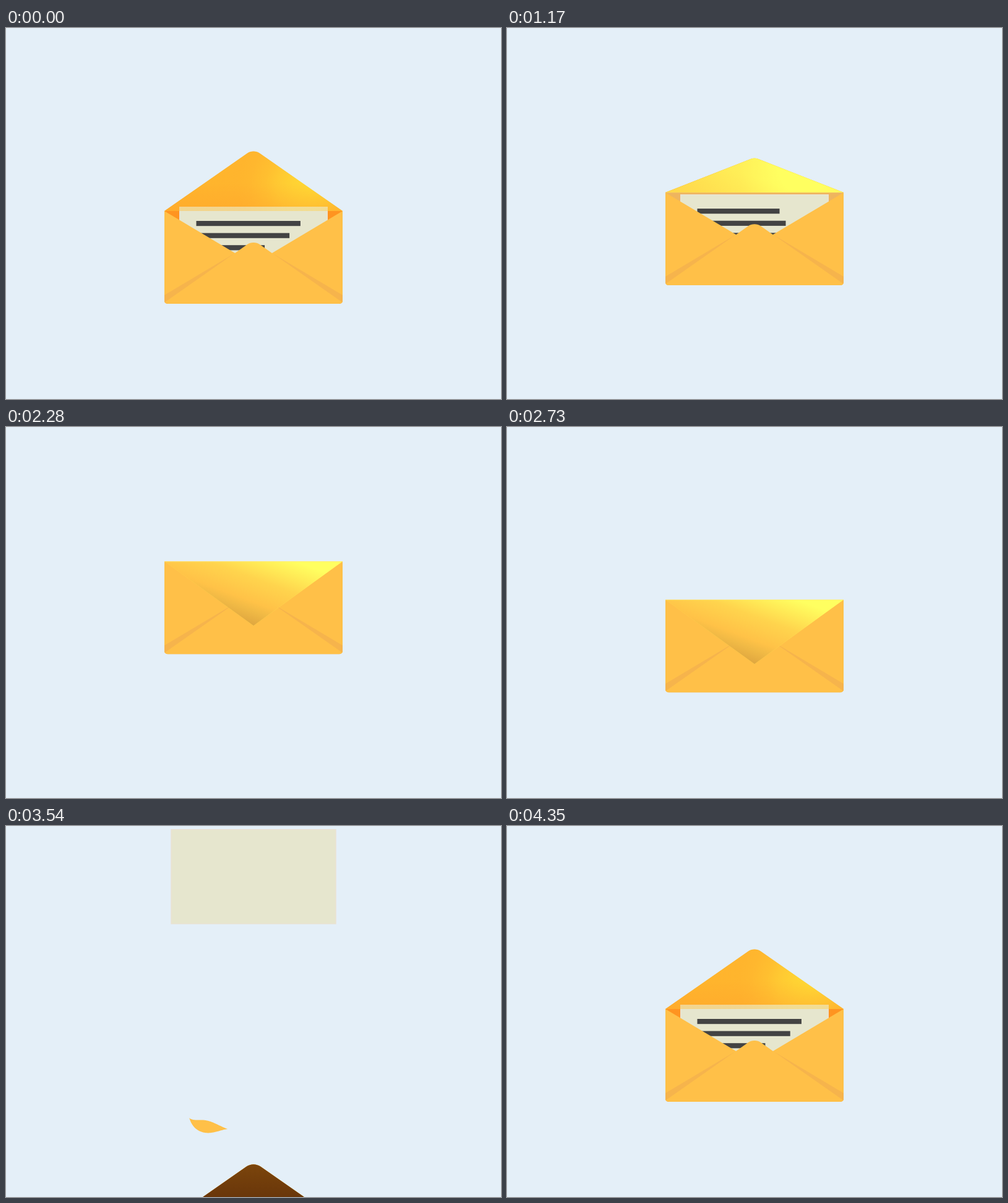
Write an HTML page with a canvas that moves like this. It is 800 px wide and 600 px high and loops after 4380 ms.

```html
<!DOCTYPE html>
<html lang="en">
<head>
<meta charset="utf-8">
<title>Envelope</title>
<style>
html, body { margin: 0; width: 100%; height: 100%; overflow: hidden; background: #e4eff8; }
canvas { display: block; }
</style>
</head>
<body>
<canvas id="stage" width="800" height="600"></canvas>
<script>
const ctx = document.getElementById('stage').getContext('2d');
const LOOP = 4380, REST = 4350, ENTER = 3420, HALF = 144, BODY = 150;
const FRONT = '#ffc048', FOLD = '#f6b44c', PAPER = '#e6e6ce';

// keys: time, y of the envelope's upper edge, speed
const RISE = [
  [0, 296, 0], [630, 275, -0.03], [900, 270, 0], [1060, 270, 0], [1620, 232, 0],
  [2130, 232, 0], [2540, 184, 0], [2640, 201, 0.5], [2730, 278, 1.15], [2970, 606, 1.5],
  [2971, 742, 0], [ENTER, 742, 0], [3870, 251, 0], [REST, 296, 0], [LOOP, 296, 0]
];
const RIBBON = [
  [290, 395], [296, 472], [358, 490], [450, 488], [540, 466],
  [616, 396], [607, 322], [550, 270], [470, 245], [400, 250], [340, 260]
];

const clamp = x => Math.min(1, Math.max(0, x));
const part = (t, a, b) => clamp((t - a) / (b - a));
const lerp = (a, b, p) => a + (b - a) * p;
const smooth = p => p * p * (3 - 2 * p);
const sineInOut = p => (1 - Math.cos(Math.PI * p)) / 2;
const backOut = p => 1 + 4.2 * (p - 1) ** 3 + 3.2 * (p - 1) ** 2;
const mix = (a, b, p) => 'rgb(' + a.map((v, i) => Math.round(lerp(v, b[i], p))) + ')';

function track(keys, t) {
  let i = 0;
  while (i < keys.length - 2 && t >= keys[i + 1][0]) i++;
  const [t0, v0, s0] = keys[i], [t1, v1, s1] = keys[i + 1];
  const d = t1 - t0, u = clamp((t - t0) / d);
  return lerp(v0, v1, smooth(u)) + d * (s0 * u * (1 - u) ** 2 - s1 * u * u * (1 - u));
}

function poly(points, fill) {
  ctx.beginPath();
  points.forEach(([x, y]) => ctx.lineTo(x, y));
  ctx.closePath();
  ctx.fillStyle = fill;
  ctx.fill();
}

function roundTriangle(base, tip, radius) {
  ctx.beginPath();
  ctx.moveTo(-HALF, base);
  ctx.arcTo(0, tip, HALF, base, radius);
  ctx.lineTo(HALF, base);
  ctx.closePath();
}

function addStops(g, stops) {
  stops.forEach(([p, c]) => g.addColorStop(p, c));
  return g;
}

const linear = (x0, y0, x1, y1, stops) => addStops(ctx.createLinearGradient(x0, y0, x1, y1), stops);
const radial = (x, y, r, stops) => addStops(ctx.createRadialGradient(x, y, 0, x, y, r), stops);

function fillWith(style, alpha = 1) {
  if (alpha <= 0) return;
  ctx.globalAlpha = alpha;
  ctx.fillStyle = style;
  ctx.fill();
  ctx.globalAlpha = 1;
}

function placed(y, scale, draw) {
  ctx.save();
  ctx.translate(400, y);
  ctx.scale(scale, scale);
  draw();
  ctx.restore();
}

function ribbonPoint(u) {
  const i = Math.min(7, Math.floor(u)), f = u - i;
  return [0, 1].map(k => {
    const [a, b, c, d] = [0, 1, 2, 3].map(j => RIBBON[i + j][k]);
    return b + f * ((c - a) + f * ((2 * a - 5 * b + 4 * c - d) + f * (3 * b - a - 3 * c + d))) / 2;
  });
}

// Tapered band along the ribbon path, limited to the range from..to
function ribbon(t, from, to) {
  if (t < 3495 || t >= 3930) return;
  const head = 8 * part(t, 3495, 3860);
  const tail = 8 * part(t, 3540, 3930) ** 2.81;
  const a = Math.max(tail, from), b = Math.min(head, to);
  if (b <= a) return;
  const width = lerp(20, 10, part(t, 3540, 3870));
  const upper = [], lower = [];
  for (let i = 0; i <= 50; i++) {
    const u = lerp(a, b, i / 50);
    const [x, y] = ribbonPoint(u);
    const p = ribbonPoint(Math.max(0, u - 0.02)), q = ribbonPoint(Math.min(8, u + 0.02));
    const angle = Math.atan2(q[1] - p[1], q[0] - p[0]);
    const r = width / 2 * Math.max(0, Math.sin(Math.PI * (u - tail) / (head - tail))) ** 1.3;
    const nx = -Math.sin(angle) * r, ny = Math.cos(angle) * r;
    upper.push([x - nx, y - ny]);
    lower.unshift([x + nx, y + ny]);
  }
  poly(upper.concat(lower), FRONT);
}

function bodyPath() {
  ctx.beginPath();
  ctx.roundRect(-HALF, 0, HALF * 2, BODY, [0, 0, 5, 5]);
}

function backFlap(tip, lit) {
  roundTriangle(0, tip, 18);
  fillWith(radial(94, -38, 100, [[0, '#ffd41e'], [0.3, '#ffc81d'], [0.75, '#ffac1a'], [1, '#ffa41a']]));
  fillWith(linear(0, -45, 0, 0, [[0, 'rgba(255,140,16,0)'], [1, 'rgba(255,140,16,.45)']]));
  fillWith(linear(0, -100, 0, 0, [[0, '#7c460c'], [0.5, '#69360a'], [1, '#5c2d08']]), 1 - lit);
}

function frontFlap(tip, fold, warm, alpha) {
  roundTriangle(0, tip, 18 * (1 - fold));
  const glow = mix([255, 226, 84], [255, 255, 96], warm);
  fillWith(radial(80, -40, 210, [
    [0, glow], [0.2, glow],
    [0.5, mix([255, 206, 74], [255, 234, 85], warm)],
    [1, mix([255, 204, 72], [255, 220, 76], warm)]
  ]), alpha);
  fillWith(linear(0, -50, 0, 0, [[0, 'rgba(255,160,60,0)'], [1, 'rgba(255,160,60,.3)']]), alpha * (1 - warm));
  if (!fold) return;
  fillWith(linear(8, -22, -34, 92, [
    [0, '#ffff60'], [0.2, '#ffea56'], [0.4, '#ffd44d'],
    [0.7, '#ffc247'], [0.82, '#f0b945'], [1, '#dfa63f']
  ]), fold);
  ctx.fillStyle = 'rgba(255,235,140,' + 0.7 * fold + ')';
  ctx.fillRect(-HALF, 0, HALF * 2, 1);
}

function letter(time) {
  ctx.fillStyle = PAPER;
  ctx.fillRect(-120, 0, 240, 138);
  ctx.strokeStyle = '#ebe0d6';
  ctx.lineWidth = 1;
  ctx.strokeRect(-119.5, 0.5, 239, 137);
  ctx.fillStyle = '#434343';
  [[133, 3940], [143, 4155], [143, 4230]].forEach(([w, start], i) => {
    ctx.fillRect(-92.5, 23 + i * 19.6, w * backOut(part(time, start, start + 750)), 8.2);
  });
}

function front() {
  ctx.save();
  bodyPath();
  ctx.clip();
  [-1, 1].forEach(s => {
    poly([[s * 145, -0.5], [s * 30, 68], [s * 30, 72], [s * 145, 151]], FRONT);
    poly([[s * 30, 68], [s * 144, 136], [s * 144, 148]], FOLD);
  });
  roundTriangle(149, 47, 18);
  fillWith(FRONT);
  ctx.fillStyle = FRONT;
  ctx.fillRect(-HALF, 148.5, HALF * 2, 2);
  ctx.restore();
}

function render(t) {
  ctx.fillStyle = '#e4eff8';
  ctx.fillRect(0, 0, 800, 600);

  const entering = t >= ENTER;
  // Writing and lighting pause at REST and go on after the loop point
  const time = entering ? Math.min(t, REST) : t + REST;
  const y = track(RISE, t);
  const scale = entering ? lerp(1.12, 1, sineInOut(part(t, ENTER, 4170))) : 1;
  const fold = entering ? 0 : smooth(part(t, 980, 1620));
  const tip = lerp(-100.5, 104, fold);
  const lit = entering ? part(t, 3540, 3800) : 1;
  const warm = entering ? 0 : part(t, 0, 600);
  const cover = part(time, 3930, 4980);
  const inside = entering
    ? mix([92, 45, 8], [255, 148, 32], lit)
    : mix([255, 148, 32], [239, 181, 94], warm);

  ribbon(t, 4.5, 8);
  placed(y, scale, () => {
    if (tip < 0) backFlap(tip, lit);
    bodyPath();
    fillWith(inside);
  });

  if (fold < 1) {
    const drop = entering && t < 3870
      ? lerp(-167, 244, Math.sin(part(t, ENTER, 3860) * Math.PI / 2))
      : y + scale * (-7 + (entering ? 0 : 10 * smooth(part(t, 800, 1150))));
    placed(drop, scale, () => letter(time));
  }

  placed(y, scale, () => {
    front();
    frontFlap(tip, fold, warm, cover);
  });
  ribbon(t, 0, 4.5);
}

const began = performance.now();
function tick() {
  render((performance.now() - began) % LOOP);
  requestAnimationFrame(tick);
}
tick();
</script>
</body>
</html>
```
